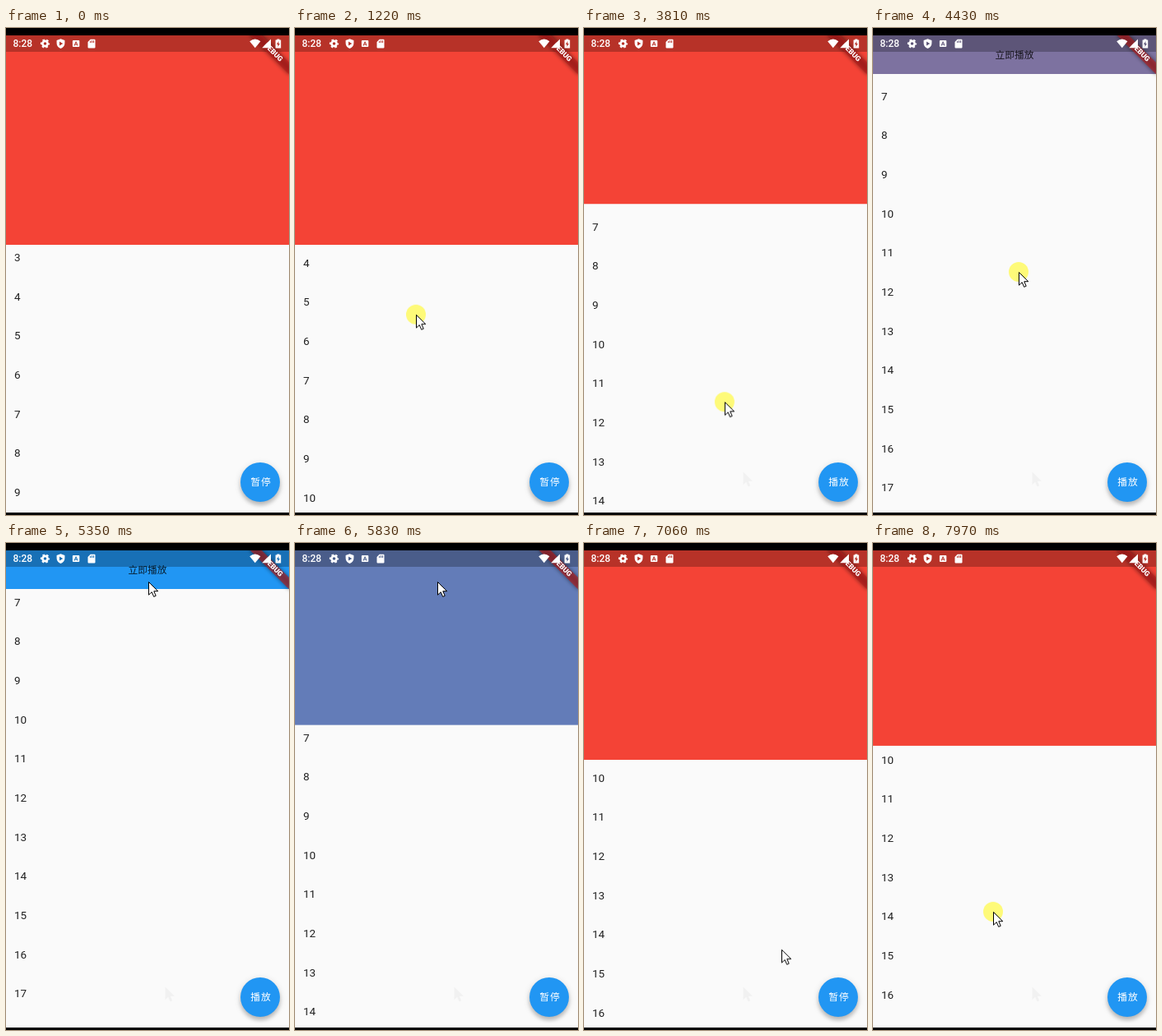
These frames come from a looping animation (344 px wide and 593 px high, 8000 ms). An HTML page:

```html
<!DOCTYPE html>
<html lang="zh">
<head>
<meta charset="utf-8">
<title>Collapsing header</title>
<style>
html, body { margin: 0; width: 100%; height: 100%; overflow: hidden; background: #000; }
.stage {
  position: relative; width: 344px; height: 593px; overflow: hidden; background: #000;
  font-family: Roboto, "Noto Sans CJK SC", "Noto Sans CJK", sans-serif;
}
.stage * { animation: 8s linear infinite; }
.screen { position: absolute; left: 0; top: 9px; width: 344px; height: 581px; overflow: hidden; background: #fafafa; }
.fold { position: absolute; left: 0; top: 0; width: 344px; animation-name: fold; }
.list { position: absolute; left: 10px; top: 104.2px; animation-name: scroll; }
.list div { height: 47.667px; line-height: 47.667px; font-size: 13.5px; color: #222; }
.head { position: absolute; left: 0; top: 0; width: 344px; height: 255px; background: #f44336; animation-name: tint; }
.title {
  position: absolute; left: 0; top: 14px; width: 344px; line-height: 20px; text-align: center;
  font-size: 11.8px; color: rgba(0, 0, 0, .8); opacity: 0; animation-name: title;
}
.status { position: absolute; left: 0; top: 0; width: 344px; height: 20px; background: rgba(0, 0, 0, .25); }
.art { position: absolute; left: 0; top: 0; }
.fab {
  position: absolute; left: 285px; top: 519.5px; width: 48px; height: 48px; border-radius: 50%;
  background: #2196f3; box-shadow: 0 4px 5px rgba(0, 0, 0, .2), 0 2px 9px rgba(0, 0, 0, .14);
}
.fab span {
  position: absolute; left: 0; width: 49px; line-height: 48px; text-align: center;
  font-size: 11.8px; font-weight: 500; letter-spacing: 1px; text-indent: 1px; color: #fff;
}
.pause { animation-name: pause !important; animation-timing-function: step-end !important; }
.play { animation-name: play !important; animation-timing-function: step-end !important; }
.trace { opacity: 0; animation: trace 8s step-end infinite; }
.pointer { animation-name: pointer; }
.press { opacity: 0; animation: press 8s step-end infinite; }

@keyframes fold {
  0%, 43.75% { transform: translateY(0); }
  51.875% { transform: translateY(-104px); }
  55.375% { transform: translateY(-208px); }
  68.5625% { transform: translateY(-208px); animation-timing-function: cubic-bezier(.215, .61, .355, 1); }
  79.35%, 97.6% { transform: translateY(0); }
  99.625% { transform: translateY(-17px); }
  100% { transform: translateY(-20px); }
}
@keyframes scroll {
  0%, 11.375% { transform: translateY(0); }
  15.25% { transform: translateY(-40.7px); }
  21% { transform: translateY(-118px); animation-timing-function: cubic-bezier(.2, .5, .4, 1); }
  31.25%, 55.375% { transform: translateY(-178.7px); }
  58.75%, 81.5% { transform: translateY(-190.2px); }
  85% { transform: translateY(-265px); animation-timing-function: cubic-bezier(.2, .6, .4, 1); }
  90.5%, 100% { transform: translateY(-332.4px); }
}
@keyframes tint {
  0%, 51.875% { background: #f44336; }
  58.125%, 70.9375% { background: #2196f3; }
  77.1875%, 100% { background: #f44336; }
}
@keyframes title {
  0%, 51.875% { opacity: 0; }
  55.375%, 68.5% { opacity: 1; }
  68.51%, 100% { opacity: 0; }
}
@keyframes pause {
  0% { visibility: visible; }
  36.25% { visibility: hidden; }
  68.5% { visibility: visible; }
  91.125%, 100% { visibility: hidden; }
}
@keyframes play {
  0% { visibility: hidden; }
  36.25% { visibility: visible; }
  68.5% { visibility: hidden; }
  91.125%, 100% { visibility: visible; }
}
@keyframes trace {
  0% { opacity: 0; }
  40%, 100% { opacity: 1; }
}
@keyframes press {
  0% { opacity: 0; }
  9.5% { opacity: 1; }
  21.1% { opacity: 0; }
  35.8% { opacity: 1; }
  36.8% { opacity: 0; }
  42.875% { opacity: 1; }
  61.125% { opacity: 0; }
  67.5% { opacity: 1; }
  69.5% { opacity: 0; }
  80.5% { opacity: 1; }
  85.2% { opacity: 0; }
  90.6% { opacity: 1; }
  92.125% { opacity: 0; }
  97%, 100% { opacity: 1; }
}
@keyframes pointer {
  0%, 2.62% { transform: translate(218px, 567px); visibility: hidden; }
  2.625% { transform: translate(218px, 567px); visibility: visible; animation-timing-function: ease-out; }
  7.375%, 11.375% { transform: translate(147px, 393px); }
  15.25% { transform: translate(147px, 349px); }
  21%, 26% { transform: translate(152px, 268px); animation-timing-function: ease-in; }
  31.625% { transform: translate(225px, 480px); }
  33.75% { transform: translate(321px, 562px); }
  35%, 37.5% { transform: translate(318px, 555px); }
  40% { transform: translate(193px, 540px); }
  41.875%, 43.75% { transform: translate(168px, 505px); }
  51.875% { transform: translate(174px, 401px); }
  55.375% { transform: translate(177px, 297px); }
  58.75%, 63% { transform: translate(177px, 284px); animation-timing-function: ease-in-out; }
  66.8%, 73.7% { transform: translate(173px, 47px); }
  76.75% { transform: translate(94px, 367px); animation-timing-function: ease-out; }
  79.625%, 81.5% { transform: translate(100px, 470px); }
  85%, 86% { transform: translate(112px, 392px); animation-timing-function: ease-in-out; }
  90%, 92.125% { transform: translate(321px, 560px); animation-timing-function: ease-in-out; }
  96.25%, 97.4% { transform: translate(147px, 468px); }
  99.625% { transform: translate(146px, 449px); }
  100% { transform: translate(146px, 446px); visibility: visible; }
}
</style>
</head>
<body>
<div class="stage">
  <div class="screen">
    <div class="fold"><div class="list" id="list"></div></div>
    <div class="fold"><div class="head"></div></div>
    <div class="title">立即播放</div>
    <div class="fab"><span class="pause">暂停</span><span class="play">播放</span></div>
    <div class="status"></div>
  </div>

  <svg class="art" width="344" height="593" viewBox="0 0 344 593">
    <defs>
      <filter id="soft" x="-30%" y="-100%" width="160%" height="300%"><feGaussianBlur stdDeviation="2.5"/></filter>
      <clipPath id="area"><rect y="9" width="344" height="581"/></clipPath>
      <path id="arrow" d="M.5.5V16.2L4.2 12.7 6.7 18.4 9.2 17.3 6.8 11.7H11.8Z"/>
    </defs>
    <g clip-path="url(#area)">
      <g transform="translate(344 9) rotate(45)">
        <rect x="-34" y="23.4" width="68" height="10" fill="#000" opacity=".5" filter="url(#soft)"/>
        <rect x="-34" y="23.4" width="68" height="10" fill="#b71c1c" fill-opacity=".63"/>
        <text x="1" y="30.6" text-anchor="middle" font-size="8.8" font-weight="900" fill="#fff">DEBUG</text>
      </g>
      <g fill="#fff">
        <text x="8.5" y="23.4" font-size="12" font-weight="500">8:28</text>
        <circle cx="47.5" cy="19" r="3.1" fill="none" stroke="#fff" stroke-width="2.6"/>
        <circle cx="47.5" cy="19" r="4.8" fill="none" stroke="#fff" stroke-width="1.7" stroke-dasharray="2.5 2.527" stroke-dashoffset="1.25"/>
        <path fill-rule="evenodd" d="M66.5 13.2L71.4 15V18.6C71.4 21.6 69.4 24 66.5 25 63.6 24 61.6 21.6 61.6 18.6V15ZM65 16.4V21.6L69.2 19Z"/>
        <path fill-rule="evenodd" d="M81.9 15H88.3Q89.3 15 89.3 16V22Q89.3 23 88.3 23H81.9Q80.9 23 80.9 22V16Q80.9 15 81.9 15ZM84.6 16.5L82.6 21.5H83.7L84.1 20.4H86.1L86.5 21.5H87.6L85.6 16.5ZM85.1 17.8L85.8 19.5H84.4Z"/>
        <path fill-rule="evenodd" d="M102.6 13.8H107.5Q108.5 13.8 108.5 14.8V23.4Q108.5 24.4 107.5 24.4H100.5Q99.5 24.4 99.5 23.4V17ZM102 16V18H103V16ZM104 15.3V18H105V15.3ZM106 15.3V18H107V15.3Z"/>
        <path d="M296.2 16.2Q302.8 10.9 309.4 16.2L302.8 24.2Z"/>
        <path d="M322 13.4V24.2H311.2Z"/>
        <path fill-rule="evenodd" d="M329.4 13.4H332.4V14.4H334.2V24.4H327.6V14.4H329.4ZM331.4 16L329 20H330.5V23L332.9 18.9H331.4Z"/>
      </g>
    </g>
    <use class="trace" href="#arrow" x="193" y="540" fill="#f1f1f1"/>
    <g class="pointer">
      <circle class="press" r="12" fill="#fffa50" fill-opacity=".76"/>
      <use href="#arrow" fill="#fff" stroke="#000" stroke-linejoin="round"/>
    </g>
  </svg>
</div>
<script>
const list = document.getElementById("list");
for (let n = 0; n < 22; n++) {
  const row = document.createElement("div");
  row.textContent = n;
  list.append(row);
}
</script>
</body>
</html>
```
